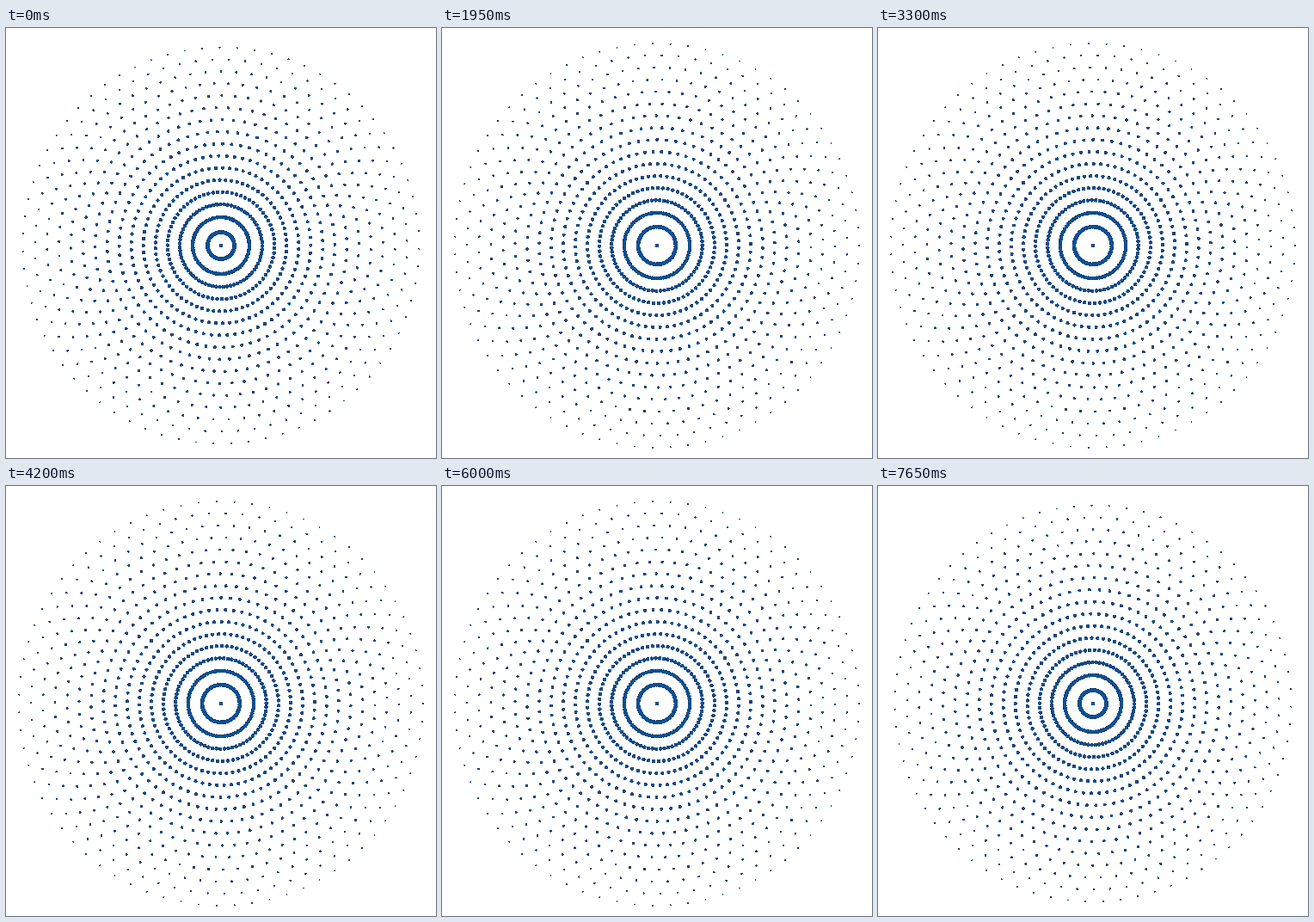
Animation of 500x500 px, one loop 7.68 s. Source, as an HTML page:

```html
<!DOCTYPE html>
<html lang="en">
<head>
<meta charset="utf-8">
<title>Expanding dot rings</title>
<style>
  html, body { margin: 0; width: 100%; height: 100%; overflow: hidden; background: #fff; }
  svg { display: block; width: 100vw; height: 100vh; }
  path { fill: none; stroke-linecap: round; shape-rendering: crispEdges; }
  .rim { stroke: #1a3862; }
  .core { stroke: #08529b; }
</style>
</head>
<body>
<svg viewBox="0 0 500 500"></svg>
<script>
const STEP = 30, STEPS = 255;   // ms per step, steps in 17 ring periods
const LOOP = 7680;
const PERIOD = 15, LIFE = 250;  // steps between rings, steps a ring lives
const DOTS = 71, CX = 250, CY = 253;
const TWIST = 0.18;             // degrees turned back per step

const svg = document.querySelector('svg');

function addPath(name) {
  const path = document.createElementNS('http://www.w3.org/2000/svg', 'path');
  path.setAttribute('class', name);
  return svg.appendChild(path);
}

const addRing = () => ({ rim: addPath('rim'), core: addPath('core') });
const rings = Array.from({ length: Math.ceil(LIFE / PERIOD) }, addRing);

// A ring bursts out of the centre, then settles to a constant speed.
const radius = age => age * 14 / PERIOD + 11 * (1 - Math.exp(-age / 12));
const dotSize = age => 5 * (1 - age / 268) ** 0.4;

function ringPath(age) {
  const r = radius(age);
  const turn = TWIST * (240 - age);
  let d = '';
  for (let i = 0; i < DOTS; i++) {
    const a = (turn + i * 360 / DOTS) * Math.PI / 180;
    d += `M${(CX + r * Math.cos(a)).toFixed(2)} ${(CY + r * Math.sin(a)).toFixed(2)}h.01`;
  }
  return d;
}

function paint({ rim, core }, age, d) {
  const size = dotSize(age);
  rim.setAttribute('d', d);
  rim.setAttribute('stroke-width', size);
  core.setAttribute('d', d);
  core.setAttribute('stroke-width', Math.max(0.6, size - 1.1));
}

paint(addRing(), 0, `M${CX} ${CY}h.01`);

let last = -1;
function draw() {
  const step = Math.floor(performance.now() % LOOP / STEP) % STEPS;
  if (step !== last) {
    last = step;
    const youngest = (step + 10) % PERIOD;
    rings.forEach((ring, k) => {
      const age = youngest + k * PERIOD;
      paint(ring, Math.min(age, LIFE), age < LIFE ? ringPath(age) : '');
    });
  }
  requestAnimationFrame(draw);
}
draw();
</script>
</body>
</html>
```
